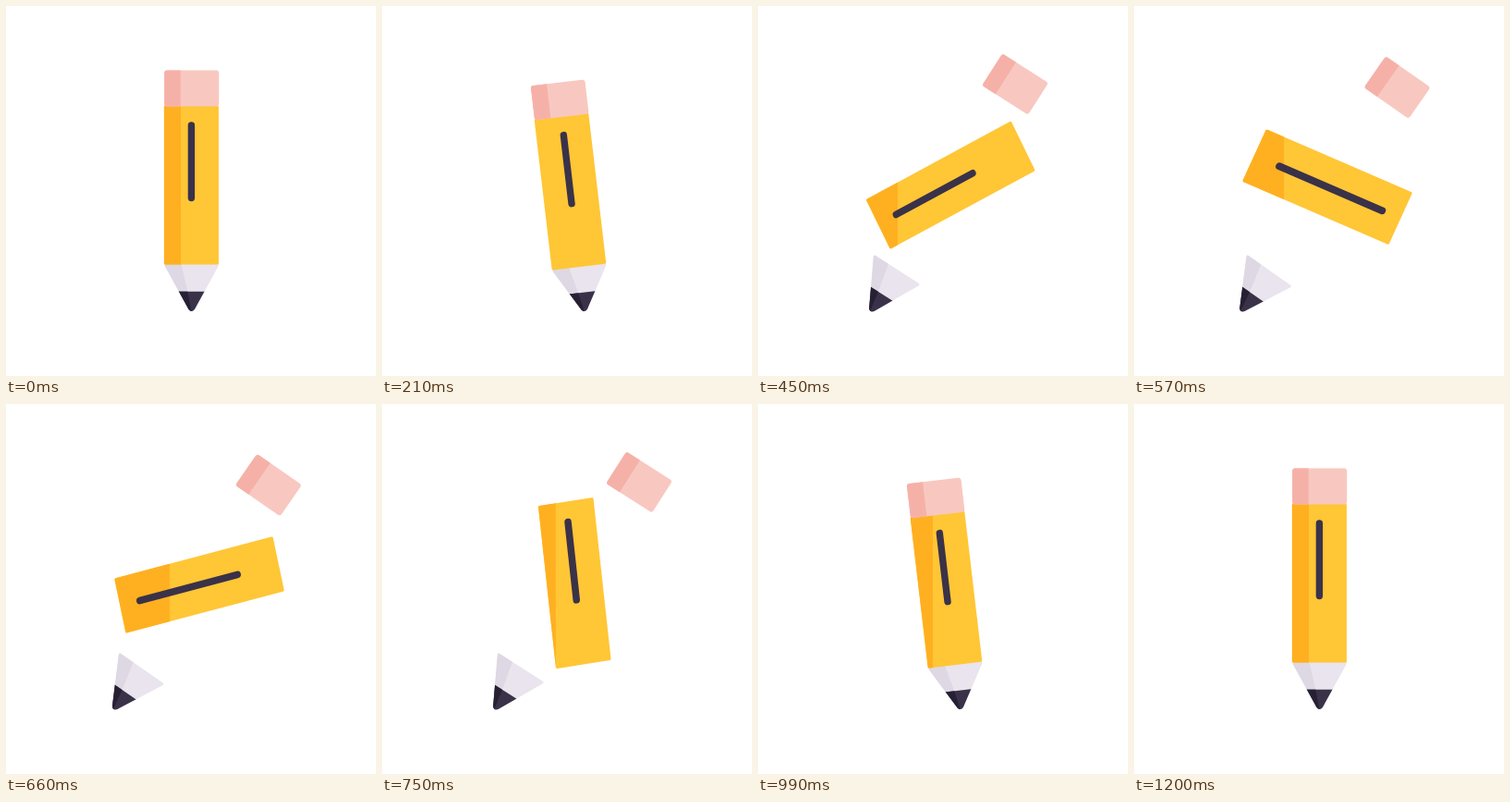
These frames come from a looping animation (400x400 px, 3260 ms). An HTML page with a canvas:

```html
<!DOCTYPE html>
<html lang="en">
<head>
<meta charset="utf-8">
<title>Pencil</title>
<style>
  html, body { margin: 0; width: 100%; height: 100%; overflow: hidden; background: #fff; }
  canvas { display: block; width: 400px; height: 400px; }
</style>
</head>
<body>
<canvas id="stage" width="400" height="400"></canvas>
<script>
const ctx = document.getElementById('stage').getContext('2d');
const LOOP = 3260, STEP = 30, END = 1200;
const DARK = '#3a3248';

const span = (t, from, to) => Math.min(1, Math.max(0, (t - from) / (to - from)));
const smooth = p => p * p * (3 - 2 * p);
const snap = p => smooth(Math.cbrt(p)); // sudden start, long soft landing
const rad = deg => deg * Math.PI / 180;

function box(w, h, r) {
  const p = new Path2D();
  p.roundRect(-w / 2, -h / 2, w, h, r);
  return p;
}

const eraser = box(59, 39.2, 3);
const barrel = box(59, 172, 1.5);
const cone = new Path2D('M-28 -51H28Q29.5 -51 29 -49L3.2 -2Q0 2 -3.2 -2L-29 -49Q-29.5 -51 -28 -51Z');
const coneShade = new Path2D('M-30 -52H-11.5L-4.5 -22L0 2H-30Z');

function rect(color, x, y, w, h) {
  ctx.fillStyle = color;
  ctx.fillRect(x, y, w, h);
}

// Fills a shape, then draws its details clipped to it.
function part(shape, color, x, y, turn, detail) {
  ctx.save();
  ctx.translate(x, y);
  ctx.rotate(rad(turn));
  ctx.fillStyle = color;
  ctx.fill(shape);
  ctx.clip(shape);
  detail();
  ctx.restore();
}

function draw(t) {
  // The pencil winds up, snaps open, then does the same backwards.
  const m = Math.min(t, END - t);
  const wind = smooth(span(m, 0, 210));
  const open = snap(span(m, 210, END / 2));
  const gap = 38.8 * open;

  // The barrel spins twice while its slot grows and shrinks.
  const turn = span(t, 311, 849);
  const spin = 720 * smooth(turn ** 0.76);
  const slot = 14 + 43 * Math.sin(Math.PI * turn) ** 4;
  const shadeX = 189 - 38 * (smooth(span(t, 0, 150)) - smooth(span(t, 450, 785)));

  rect('#fff', 0, 0, 400, 400);
  ctx.save();
  ctx.translate(200.7 + 18.3 * wind - 103.5 * open, 330);
  ctx.rotate(rad(41.7 * open - 6.7 * wind));
  ctx.scale(1, 1 - 0.045 * wind + 0.1 * open);

  part(cone, '#e9e4ed', 0, 0, 0, () => {
    ctx.fillStyle = '#ded8e4';
    ctx.fill(coneShade);
    rect(DARK, -30, -21.3, 60, 30);
    ctx.clip(coneShade);
    rect('#272034', -30, -21.3, 60, 30);
  });

  part(barrel, '#ffc636', -0.3, -136.5 - gap * 0.48, spin, () => {
    ctx.save();
    ctx.resetTransform(); // the shade stays upright on the stage
    rect('#ffb021', 0, 0, shadeX, 400);
    ctx.restore();
    ctx.beginPath();
    ctx.moveTo(0, -64.5);
    ctx.lineTo(0, slot);
    ctx.lineWidth = 7.4;
    ctx.lineCap = 'round';
    ctx.strokeStyle = DARK;
    ctx.stroke();
  });

  part(eraser, '#f8c8c0', 0, -241 - gap, 0, () => rect('#f5b1a8', -30, -20, 18, 40));
  ctx.restore();
}

const start = performance.now();
function tick() {
  const t = (performance.now() - start) % LOOP;
  draw(Math.min(END, Math.floor(t / STEP) * STEP));
  requestAnimationFrame(tick);
}
tick();
</script>
</body>
</html>
```
